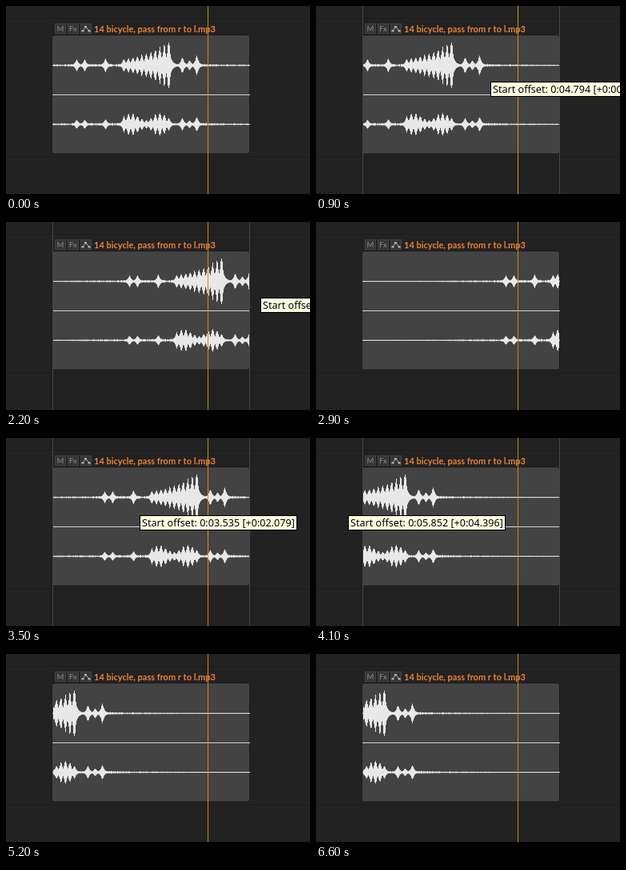
An HTML page with a canvas for the animation above (6.8 s loop, 380 by 236 pixels).

```html
<!DOCTYPE html>
<html lang="en">
<head>
<meta charset="utf-8">
<title>Audio item slip edit</title>
<style>
  html, body { margin: 0; width: 100%; height: 100%; overflow: hidden; background: #222; }
  canvas { display: block; width: 380px; height: 236px; }
</style>
</head>
<body>
<canvas id="stage" width="380" height="236"></canvas>
<script>
const ctx = document.getElementById('stage').getContext('2d');
const LOOP = 6800, STEP = 100, BLINK = 468;
const CLIP = { x: 58, y: 37, w: 247, h: 149 };
const PX_PER_SECOND = 54.82;

// Each drag moves the loudest burst; lead and tail shape its easing.
const DRAGS = [
  { start: 600, end: 1300, from: 203, to: 100, tip: 49, lead: 2, tail: 2 },
  { start: 1600, end: 2600, from: 100, to: 352, tip: 49, lead: 2, tail: 2.48 },
  { start: 3000, end: 4750, from: 352, to: 85, tip: -71, lead: 1.5, tail: 3.37 }
];

const BURSTS = makeBursts();

// The passing bicycle: a row of growing pulses with a few single knocks around it.
function makeBursts() {
  const knocks = [[-115, 7], [-105, 7], [-79, 8], [17, 10], [26, 6], [35, 12]];
  const bursts = knocks.map(([at, height]) => ({ at, upper: height, lower: height * 0.75 }));
  for (let k = 0; k <= 10; k++) {
    bursts.push({
      at: -5.6 * k,
      upper: 32 * Math.exp(-k / 7),
      lower: 10 + 5 * Math.cos((k - 2) * Math.PI / 3.2)
    });
  }
  return bursts;
}

function box(x, y, w, h, color) {
  ctx.fillStyle = color;
  ctx.fillRect(x, y, w, h);
}

function text(str, x, y, font, color) {
  ctx.font = font;
  ctx.fillStyle = color;
  ctx.fillText(str, x, y);
}

function noise(n) {
  const s = Math.sin(n * 127.1 + 11.7) * 43758.5453;
  return s - Math.floor(s);
}

function level(d, channel) {
  const grain = noise(d + channel.length * 31 + channel.charCodeAt(0));
  const hiss = 1.3 * Math.exp(-Math.max(0, d - 45, -120 - d) / 45);
  let peak = 0;
  for (const burst of BURSTS) {
    const reach = (d - burst.at) / 2;
    peak = Math.max(peak, burst[channel] / (1 + reach * reach));
  }
  if (peak < 0.5) peak = 0;
  return 0.5 + Math.max(peak * (0.85 + grain * 0.15), hiss * grain);
}

function wave(centre, channel, peakX) {
  for (let x = CLIP.x + 1; x < CLIP.x + CLIP.w - 1; x++) {
    const h = level(x - peakX, channel);
    box(x, centre + 0.5 - h, 1, 2 * h, '#e8e8e8');
  }
  box(CLIP.x, centre, CLIP.w, 1, '#e8e8e8');
}

function drawLanes() {
  box(0, 0, 380, 236, '#222222');
  box(0, 15, 380, 1, '#1b1b1b');
  box(0, 189, 380, 1, '#1b1b1b');
}

function drawHeader() {
  for (const x of [61, 77, 93]) {
    box(x, 22, 14, 13, '#454545');
    box(x + 1, 23, 12, 11, '#333333');
  }
  text('M', 63.5, 32, '9.5px Lato, sans-serif', '#909090');
  text('Fx', 79, 32, '9.5px Lato, sans-serif', '#909090');
  const nodes = [[96, 31], [99.5, 26], [104, 31]];
  ctx.strokeStyle = '#b0b0b0';
  ctx.lineWidth = 1;
  ctx.beginPath();
  nodes.forEach(([x, y]) => ctx.lineTo(x, y));
  ctx.stroke();
  nodes.forEach(([x, y]) => box(x - 1.5, y - 1, 3, 2.5, '#b0b0b0'));
  text('14 bicycle, pass from r to l.mp3', 110, 33, 'bold 11px Lato, sans-serif', '#ee8435');
}

function drawClip(peakX) {
  ctx.beginPath();
  ctx.roundRect(CLIP.x - 0.5, CLIP.y - 0.5, CLIP.w, CLIP.h, 3);
  ctx.fillStyle = '#434343';
  ctx.fill();
  ctx.strokeStyle = '#1c1c1c';
  ctx.lineWidth = 1;
  ctx.stroke();
  wave(74, 'upper', peakX);
  wave(148, 'lower', peakX);
  box(CLIP.x, 111, CLIP.w, 1, '#d6d6d6');
}

function drawGuides() {
  for (const x of [CLIP.x, CLIP.x + CLIP.w - 1]) box(x, 0, 1, 236, '#3b4a52');
}

function offsetMs(peakX) {
  return Math.round(3535.3 + (238 - peakX) / PX_PER_SECOND * 1000);
}

function clock(ms) {
  return '0:' + (ms / 1000).toFixed(3).padStart(6, '0');
}

function drawTip(drag, peakX, time) {
  const now = offsetMs(peakX);
  const change = now - offsetMs(drag.from);
  const sign = change < 0 ? '-' : '+';
  const x = peakX + drag.tip;
  const y = drag.tip < 0 && time < 4300 ? 97 : 95;
  box(x, y, 197, 19, '#000');
  box(x + 1, y + 1, 195, 17, '#ffffe1');
  text(`Start offset: ${clock(now)} [${sign}${clock(Math.abs(change))}]`,
    x + 3, y + 14, '12.6px "Noto Sans", sans-serif', '#000');
}

function ease(u, lead, tail) {
  return 1 - (1 - u ** lead) ** tail;
}

function peakAt(time) {
  const drag = DRAGS.findLast(d => time >= d.start);
  if (!drag) return DRAGS[0].from;
  const u = Math.min(1, (time - drag.start) / (drag.end - drag.start));
  return Math.round(drag.from + (drag.to - drag.from) * ease(u, drag.lead, drag.tail));
}

function draw(time) {
  const peakX = peakAt(time);
  const drag = DRAGS.find(d => time > d.start && time < d.end);
  const bright = Math.floor((time + 6) / BLINK) % 2;
  drawLanes();
  drawHeader();
  drawClip(peakX);
  if (drag) drawGuides();
  box(252, 0, 1, 236, bright ? '#d6931c' : '#c5881b');
  if (drag) drawTip(drag, peakX, time);
}

const begin = performance.now();
function tick() {
  const time = (performance.now() - begin) % LOOP;
  draw(Math.floor(time / STEP) * STEP);
  requestAnimationFrame(tick);
}
tick();
</script>
</body>
</html>
```
